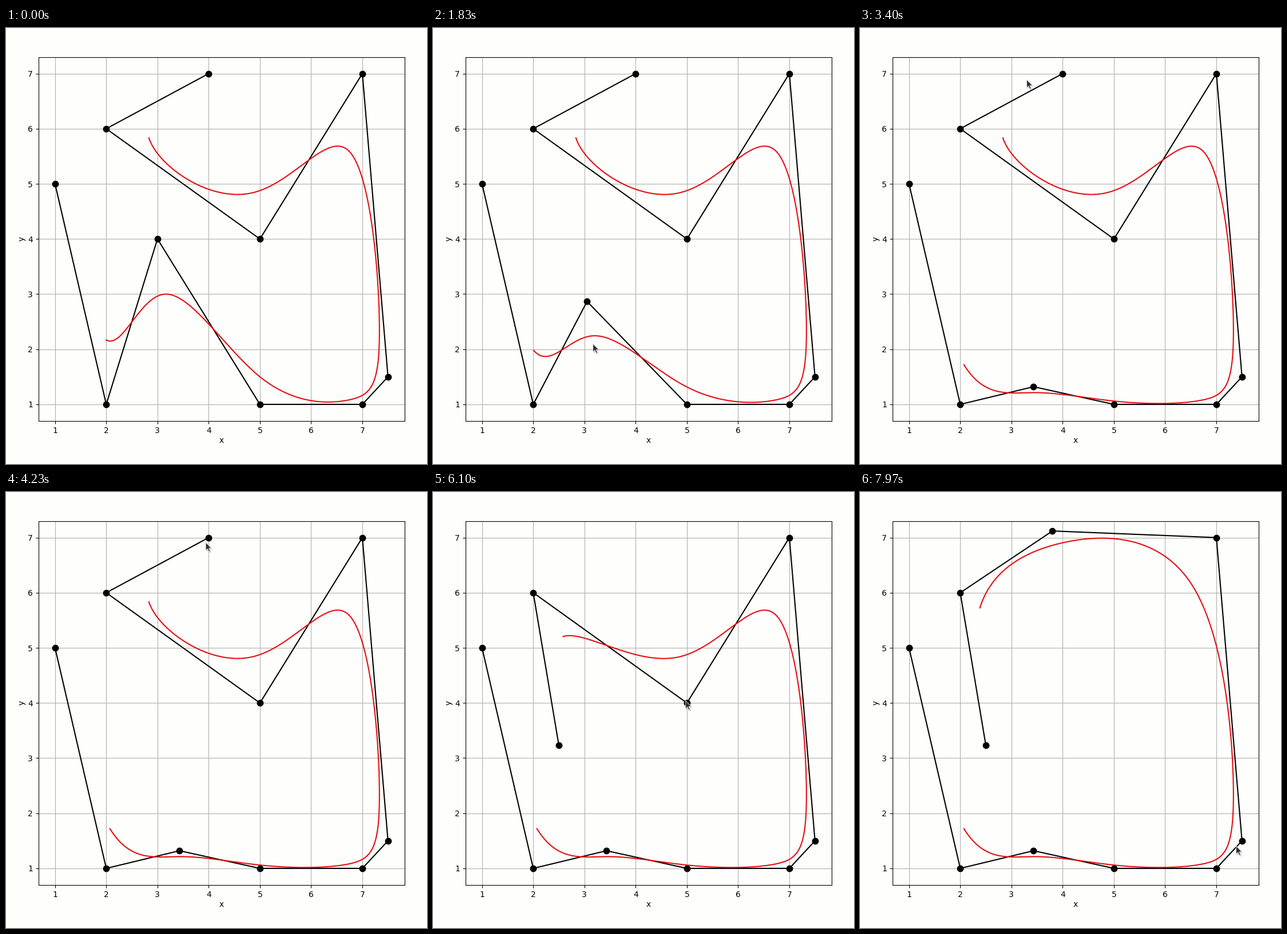
Recreate the animation shown at these times as a matplotlib script. Size 736 by 761 pixels, loop 8000 ms.

```python
import numpy as np
import matplotlib.pyplot as plt
from matplotlib.animation import FuncAnimation
from matplotlib.patches import Polygon
from matplotlib.transforms import IdentityTransform

W, H, DPI = 736, 761, 100
FRAMES, STEP = 200, 40
LAG = 120    # a dragged point trails the pointer by this many ms
BEND = 2.5   # sideways motion starts later than vertical motion
BG = "#fefefc"

CONTROL = np.array([(1, 5), (2, 1), (3, 4), (5, 1), (7, 1), (7.5, 1.5),
                    (7, 7), (5, 4), (2, 6), (4, 7)], float)

# pointer moves: start ms, end ms, goal, dragged control point
START = (4.5, 4.7)
MOVES = [(600, 1150, (3, 4), None),
         (1420, 2000, (3.43, 1.32), 2),
         (2120, 2570, (3.23, 6.83), None),
         (2700, 4230, (3.97, 6.87), None),
         (4250, 4380, (4, 7), None),
         (4480, 5560, (2.5, 3.23), 9),
         (5680, 6060, (5, 4), None),
         (6250, 7120, (3.8, 7.12), 7),
         (7220, 7420, (8.05, 5.7), None),
         (7420, 7970, (7.41, 1.36), None)]

ARROW = np.array([(0, 0), (0, -14), (3.2, -11), (5.4, -16.2),
                  (7.6, -15.2), (5.4, -10.2), (9.6, -9.8)])
TIP = np.array((-2.3, 4))


def glide(t, start, end, a, b):
    """Eased, slightly bowed move from a to b."""
    u = np.clip((t - start) / (end - start), 0, 1)
    f = u * u * (3 - 2 * u)
    return np.array(a) + np.subtract(b, a) * (f ** BEND, f)


def state(t):
    """Pointer place and control points, in data units."""
    pos, points = START, CONTROL.copy()
    for start, end, goal, i in MOVES:
        if i is not None:
            points[i] = glide(t - LAG, start, end, points[i], goal)
        pos = glide(t, start, end, pos, goal)
    return pos, points


def spline(p):
    """Uniform cubic B-spline through the control polygon."""
    u = np.linspace(0, 1, 40)[:, None]
    v = 1 - u
    basis = np.hstack([v**3, 3*u**3 - 6*u**2 + 4,
                       3*v**3 - 6*v**2 + 4, u**3]) / 6
    return np.vstack([basis @ p[k:k + 4] for k in range(len(p) - 3)])


fig = plt.figure(figsize=(W / DPI, H / DPI), dpi=DPI, facecolor=BG)
ax = fig.add_axes([56.6 / W, 75.2 / H, 640.3 / W, 635.1 / H], facecolor=BG)
ax.set(xlim=(0.675, 7.825), ylim=(0.7, 7.3),
       xticks=range(1, 8), yticks=range(1, 8))
ax.set_xlabel("x", labelpad=2.7)
ax.set_ylabel("y", labelpad=2.7)
ax.grid(True)

polygon, = ax.plot([], [], "ko-", ms=7.5, lw=1.5)
curve, = ax.plot([], [], color="#e60c10", lw=1.5)


def arrow(**style):
    return fig.add_artist(Polygon(ARROW, closed=True, visible=False,
                                  transform=IdentityTransform(), **style))


shadow = arrow(fc="#888888", ec="#888888", lw=1, alpha=0.25, zorder=9)
cursor = arrow(fc="#2e2e36", ec="#e4e4e4", lw=0.6, zorder=10)


def update(i):
    t = i * STEP
    pos, points = state(t)
    polygon.set_data(*points.T)
    curve.set_data(*spline(points).T)
    tip = ax.transData.transform(pos) + TIP
    for art, shift in ((shadow, (1.5, -1.5)), (cursor, (0, 0))):
        art.set_xy(ARROW + tip + shift)
        art.set_visible(t >= MOVES[0][0])
    return polygon, curve, shadow, cursor


anim = FuncAnimation(fig, update, frames=FRAMES, interval=STEP,
                     init_func=lambda: update(0), repeat=True, repeat_delay=0)
plt.show()
```
